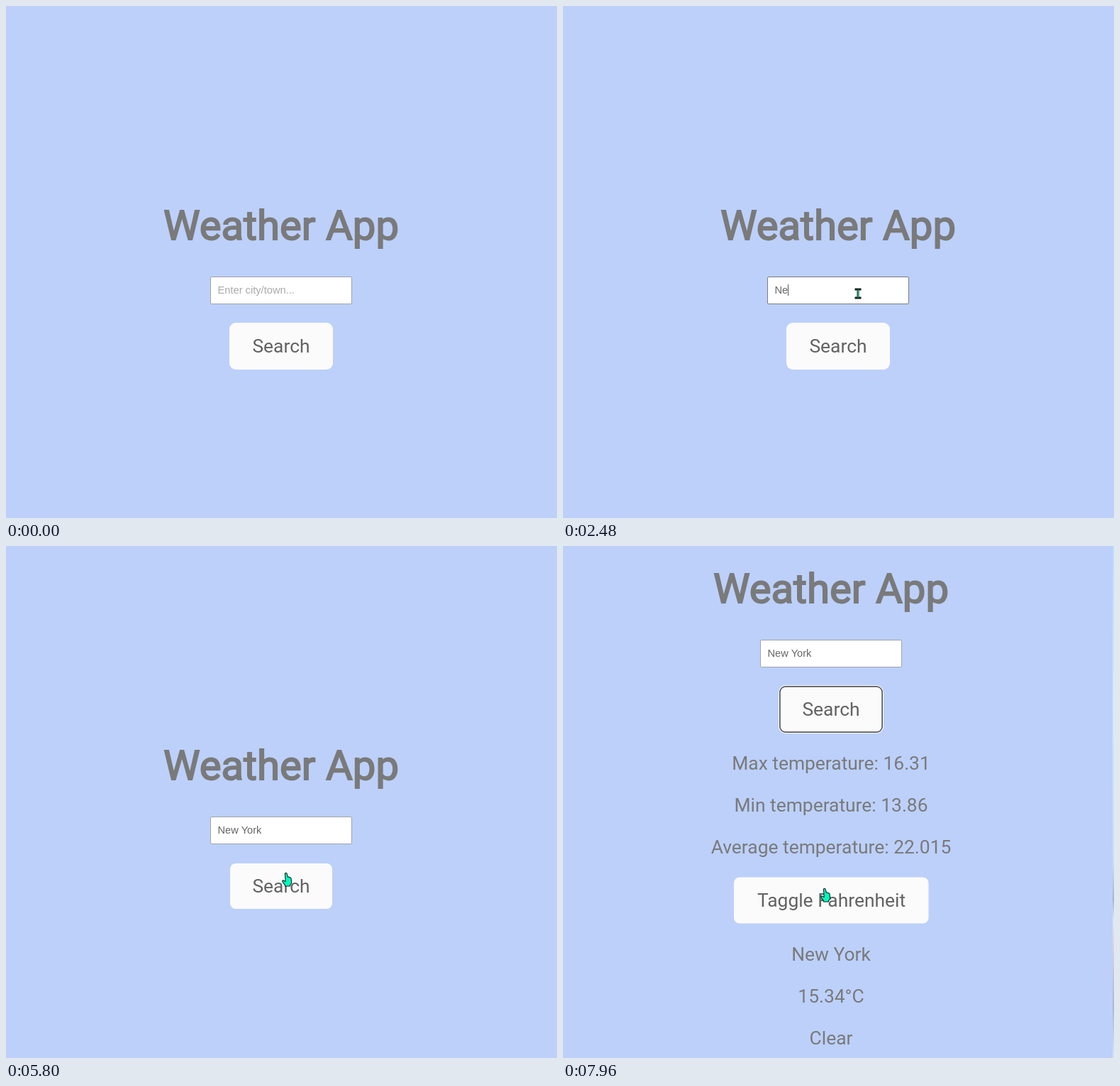
Write an HTML page that moves like this. It is 777 px wide and 721 px high and loops after 7.99 s.

```html
<!DOCTYPE html>
<html lang="en">
<head>
<meta charset="utf-8">
<title>Weather App</title>
<style>
  html, body { margin: 0; width: 100%; height: 100%; overflow: hidden; background: #bcd0fa; }
  svg { display: block; width: 777px; height: 721px; }
  text { font: 26.4px Roboto, sans-serif; text-anchor: middle; fill: #7a7a7a; }
  .title { font-size: 58.08px; stroke: #7a7a7a; stroke-width: 1.8px; }
  .button { fill: #fbfbfb; }
  .label { fill: #626262; }
  #field { fill: #fff; }
  #entry { font: 14.67px "Liberation Sans", Arial, sans-serif; text-anchor: start; }
  #caret { fill: #555; }
  #arrow, #hand { fill: #00f9bd; stroke: #10221d; stroke-width: 1.1px; stroke-linejoin: round; }
</style>
</head>
<body>
<svg viewBox="0 0 777 721">
  <defs>
    <linearGradient id="edgeFill" x2="0" y2="1">
      <stop offset="0" stop-color="#b9dcfb"/>
      <stop offset=".3" stop-color="#c8ecfb"/>
      <stop offset=".62" stop-color="#c4e0f2"/>
      <stop offset=".69" stop-color="#a3b6d2"/>
      <stop offset=".73" stop-color="#d6e8f5"/>
      <stop offset=".77" stop-color="#dcd6e2"/>
      <stop offset=".9" stop-color="#a9b9d6"/>
      <stop offset="1" stop-color="#cfe6f5"/>
    </linearGradient>
  </defs>

  <g id="form">
    <text class="title" x="388" y="329">Weather App</text>
    <rect id="field" x="288.5" y="381.5" width="199" height="38" rx="1.5"/>
    <text id="entry" x="298.5" y="405"></text>
    <rect id="caret" y="392" width="1" height="16"/>
    <g id="ring">
      <rect x="314" y="445" width="148" height="68" rx="10" fill="#fff"/>
      <rect x="315" y="446" width="146" height="66" rx="9" fill="#585858"/>
    </g>
    <rect id="search" class="button"/>
    <text class="label" x="388" y="488">Search</text>
  </g>

  <g id="results">
    <rect x="775" width="2" height="721" fill="url(#edgeFill)"/>
    <text x="378" y="315">Max temperature: 16.31</text>
    <text x="378" y="374">Min temperature: 13.86</text>
    <text x="378" y="433">Average temperature: 22.015</text>
    <rect class="button" x="241" y="466.5" width="274.5" height="65" rx="8"/>
    <text class="label" x="378.5" y="508">Taggle Fahrenheit</text>
    <text x="378" y="584">New York</text>
    <text x="378" y="643">15.34°C</text>
    <text x="378" y="702">Clear</text>
  </g>

  <g id="pointer">
    <path id="arrow" d="M0 0V16L3.7 12.6L6.2 18.3L8.7 17.2L6.2 11.6H11.2Z"/>
    <path id="beam" d="M-4.5 -7.5h9v3h-9zM-4.5 4.5h9v3h-9zM-1.5 -5h3v10h-3z" fill="#10221d"/>
    <path id="beamCore" d="M-.6 -5.5h1.6v11h-1.6z" fill="#12b588"/>
    <path id="hand" d="M-1.6 1.2Q-.4 -.6 .9 .9L2.6 6.3Q4.4 5.4 5 7Q6.7 6.3 7 8.2Q7.6 12 7.6 14.2Q7.2 16.6 5.6 17.4L5.4 19H-1.4L-1.8 17.2Q-4.4 14.6 -5.3 11.8Q-4.4 10 -2.6 11.6L-1 12.6L-1 8.5Z"/>
  </g>
</svg>
<script>
  const LOOP = 7990;
  const CITY = 'New York';
  const KEY_TIMES = [2030, 2480, 3280, 3490, 3990, 4190, 4670, 4910];
  const CARET_X = [299, 308, 317, 328, 331, 341, 348, 352, 360];
  const CARET_ON = [[1150, 1650], [2030, 3010], [3280, 5410], [5910, 6450], [6960, 7490]];

  // Each move: start time, end time, start point, end point, easing.
  const inOut = p => p * p * (3 - 2 * p);
  const out = p => 1 - (1 - p) ** 3;
  const MOVES = [
    [150, 740, [705, 722], [416, 404.5], inOut],
    [5580, 5960, [416, 404.5], [393, 464], out],
    [6960, 7290, [393, 464], [368.5, 482], inOut]
  ];

  const $ = id => document.getElementById(id);
  const show = (id, on) => $(id).setAttribute('visibility', on ? 'visible' : 'hidden');
  const set = (id, attrs) => {
    for (const [key, value] of Object.entries(attrs)) $(id).setAttribute(key, value);
  };
  const inside = (x, y, left, top, right, bottom) =>
    x >= left && x < right && y >= top && y < bottom;

  function pointerAt(t) {
    const [start, end, a, b, ease] = MOVES.filter(m => t >= m[0]).pop() || MOVES[0];
    const p = ease(Math.min(1, Math.max(0, (t - start) / (end - start))));
    return a.map((v, i) => v + (b[i] - v) * p);
  }

  function render(t) {
    const [x, y] = pointerAt(t);
    const loaded = t >= 7920;
    const focused = t >= 7490;
    const overField = !loaded && inside(x, y, 288, 381, 488, 420);
    const overButton = loaded || inside(x, y, 315, 446, 461, 512);
    const visible = t >= 150;
    const typed = KEY_TIMES.filter(k => t >= k).length;

    set('form', { transform: loaded ? 'translate(-10 -249)' : '' });
    set('field', { stroke: overField ? '#7c7c7c' : '#a3a3a8' });
    $('entry').textContent = typed ? CITY.slice(0, typed) : 'Enter city/town...';
    $('entry').style.fill = typed ? '#666' : '#aaa';
    set('caret', { x: CARET_X[typed] });
    show('caret', CARET_ON.some(([from, to]) => t >= from && t < to));

    const inset = focused ? 1.7 : overButton ? 1 : 0;
    set('search', {
      x: 315 + inset, y: 446 + inset,
      width: 146 - 2 * inset, height: 66 - 2 * inset, rx: 9 - inset
    });
    show('ring', focused);
    show('results', loaded);

    set('pointer', { transform: `translate(${Math.round(x)} ${Math.round(y)})` });
    show('arrow', visible && !overField && !overButton);
    show('beam', visible && overField);
    show('beamCore', visible && overField);
    show('hand', visible && overButton);
  }

  function tick() {
    render(performance.now() % LOOP);
    requestAnimationFrame(tick);
  }
  tick();
</script>
</body>
</html>
```
